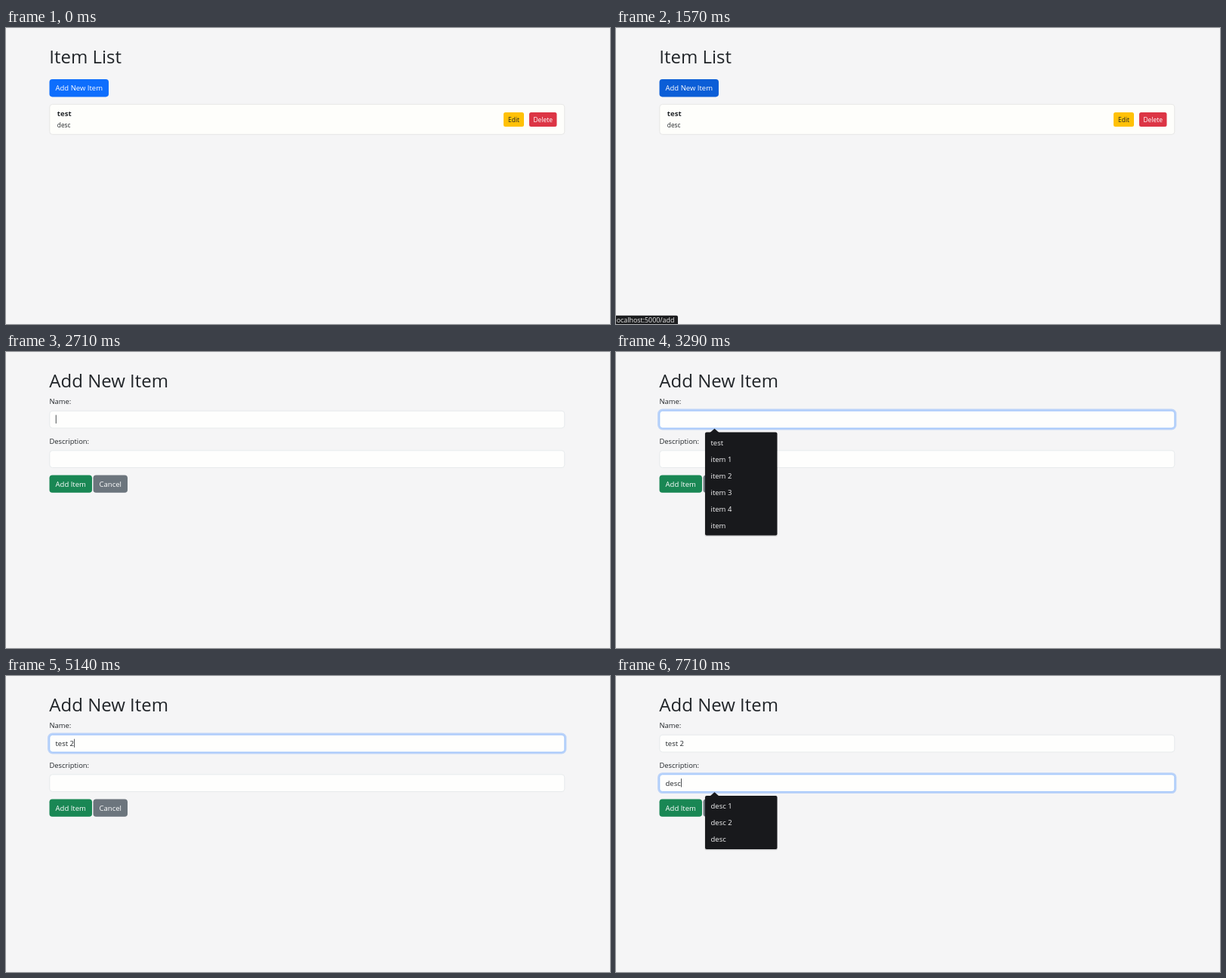
These frames come from a looping animation (800 by 393 pixels, 8 s). An HTML page:

```html
<!DOCTYPE html>
<html lang="en">
<head>
<meta charset="utf-8">
<title>Item List</title>
<style>
  html, body { margin: 0; width: 100%; height: 100%; overflow: hidden; background: #f5f5f6; }
  svg { display: block; width: 100%; height: 100%; }
  text { font-family: "Open Sans", "Noto Sans", sans-serif; white-space: pre; }
</style>
</head>
<body>
<svg id="stage" viewBox="0 0 800 393"></svg>
<script>
const LOOP = 8000;
const INK = '#212529';
const stage = document.getElementById('stage');
const ruler = document.createElement('canvas').getContext('2d');
ruler.font = '9.5px "Open Sans", "Noto Sans", sans-serif';

const ramp = (t, from, to) => Math.min(1, Math.max(0, (t - from) / (to - from)));
const mix = (a, b, k) => `rgb(${a.map((v, i) => Math.round(v + (b[i] - v) * k))})`;
// Value of the last [time, value] step already reached.
const stepAt = (t, steps) => steps.reduce((value, [start, next]) => t >= start ? next : value, null);

const rect = (x, y, w, h, r, fill, extra = '') =>
  `<rect x="${x}" y="${y}" width="${w}" height="${h}" rx="${r}" fill="${fill}" ${extra}/>`;
const text = (x, y, size, str, fill = INK, extra = '') =>
  `<text x="${x}" y="${y}" font-size="${size}" fill="${fill}" ${extra}>${str}</text>`;
const title = str => text(57.3, 47, 24, str);

function button(x, y, w, h, label, fill, { size = 9.5, color = '#fff', r = 3.8 } = {}) {
  return rect(x, y, w, h, r, fill) +
    text(x + w / 2, y + h / 2 + size * 0.36, size, label, color, 'text-anchor="middle"');
}

function input(y, value, focus, caret) {
  const ring = focus
    ? rect(56.5, y - 0.9, 684.5, 25, 5, 'none', `stroke="#0d6efd" stroke-opacity="${0.25 * focus}" stroke-width="2.8"`)
    : '';
  const border = mix([222, 226, 230], [134, 183, 254], focus);
  const caretX = 65.8 + ruler.measureText(value).width;
  return ring +
    rect(57.8, y + 0.3, 682, 22.8, 3.8, '#fefefd', `stroke="${border}" stroke-width=".7"`) +
    text(65.5, y + 15.2, 9.5, value) +
    (caret ? rect(caretX, y + 5.7, 0.8, 11.3, 0, INK) : '');
}

function suggestions(y, items, opacity = 1) {
  const height = 5 + 22 * items.length;
  return `<g opacity="${opacity}">` +
    rect(117.5, y + 0.5, 96.5, height + 1, 2.5, '#000', 'opacity=".12"') +
    `<path d="M124.5 ${y + 0.5}l6-5.3 6 5.3z" fill="#18191c"/>` +
    rect(118, y, 95.5, height, 2, '#18191c') +
    items.map((item, i) => text(125.5, y + 17 + 22 * i, 9.5, item, '#f4f4f5')).join('') + '</g>';
}

function statusBar(opacity) {
  return opacity > 0 ? `<g opacity="${opacity}">` +
    rect(-4, 381.7, 86, 16, 2, '#1d1e20') +
    text(-1.5, 391.3, 8.9, 'localhost:5000/add', '#eee') + '</g>' : '';
}

function listPage(t) {
  const blue = t >= 1860 ? 'rgb(10,88,202)' : mix([13, 110, 253], [11, 94, 215], ramp(t, 1140, 1290));
  const small = { size: 8.5, r: 2.5 };
  return title('Item List') +
    button(57.5, 68, 78.5, 23.4, 'Add New Item', blue) +
    rect(57.8, 101.3, 682, 40, 3.8, '#fefefb', 'stroke="#dedfdf" stroke-width=".7"') +
    text(67.8, 117.4, 9.6, 'test', INK, 'font-weight="700"') +
    text(67.8, 132, 8.3, 'desc') +
    button(659, 112, 27, 19, 'Edit', '#ffc107', { ...small, color: INK }) +
    button(693, 112, 36.5, 19, 'Delete', '#dc3545', small);
}

function formPage(t) {
  const onDescription = t >= 6290;
  const name = stepAt(t, [[0, ''], [3860, 't'], [4140, 'tes'], [4290, 'test'], [4860, 'test '], [5140, 'test 2']]);
  const description = stepAt(t, [[0, ''], [7140, 'd'], [7430, 'de'], [7710, 'desc']]);
  const caret = stepAt(t, [[0, false], [2710, true], [3290, false], [3860, true],
    [5710, false], [6290, true], [7000, false], [7140, true]]);
  const nameFocus = ramp(t, 2715, 2860) * (1 - ramp(t, 6290, 6425));
  const descriptionFocus = ramp(t, 6290, 6425);

  let popup = '';
  if (t >= 6430) popup = suggestions(159, ['desc 1', 'desc 2', 'desc']);
  else if (t >= 3860 && t < 4430) popup = suggestions(106.5, ['test'], t < 4290 ? 1 : 0.73);
  else if (t >= 2860 && t < 3860) {
    popup = suggestions(106.5, ['test', 'item 1', 'item 2', 'item 3', 'item 4', 'item']);
  }

  return title('Add New Item') +
    text(57.5, 69, 9.4, 'Name:') +
    input(77.9, name, nameFocus, caret && !onDescription) +
    text(57.5, 121.5, 9.4, 'Description:') +
    input(130.5, description, descriptionFocus, caret && onDescription) +
    button(57.5, 163.5, 56.5, 23.3, 'Add Item', '#198754') +
    button(115.5, 163.5, 45.5, 23.3, 'Cancel', '#6c757d') +
    popup;
}

let shown = '';
function draw(now) {
  const t = now % LOOP;
  const status = ramp(t, 1250, 1430) * (1 - ramp(t, 2140, 2430));
  const markup = rect(0, 0, 800, 393, 0, '#f5f5f6') +
    (t < 2000 ? listPage(t) : formPage(t)) + statusBar(status);
  if (markup !== shown) stage.innerHTML = shown = markup;
  requestAnimationFrame(() => draw(performance.now() - start));
}
const start = performance.now();
draw(0);
</script>
</body>
</html>
```
